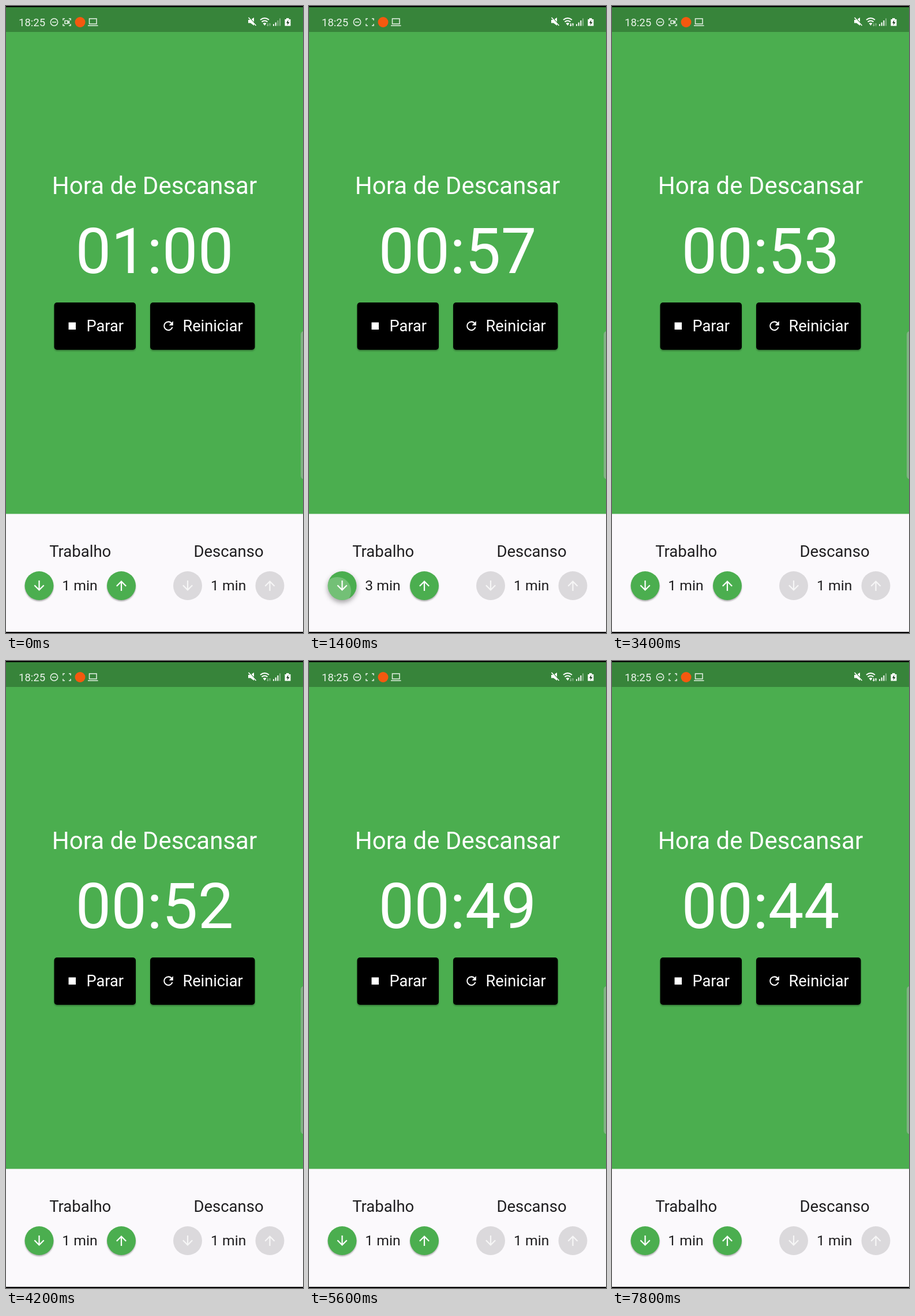
Animation of 515 by 1087 pixels, one loop 8000 ms. Source, as an HTML page:

```html
<!DOCTYPE html>
<html lang="pt">
<head>
<meta charset="utf-8">
<title>Hora de Descansar</title>
<style>
  html, body { margin: 0; width: 100%; height: 100%; overflow: hidden; background: #000; }
  svg { display: block; width: 100vw; height: 100vh; }
  text { font-family: Roboto, sans-serif; fill: #fff; }
  .dark text { fill: #1f1e20; }
  .middle { text-anchor: middle; }
  .raised { filter: drop-shadow(0 2px 1.3px rgba(0, 0, 0, .3)); }
  .pressed { filter: drop-shadow(0 4px 4px rgba(0, 0, 0, .36)); }
  .line { fill: none; stroke: #e6f1e6; stroke-width: 1.5; }
</style>
</head>
<body>
<svg viewBox="0 0 515 1087" preserveAspectRatio="none">
  <defs>
    <path id="arrow" d="M8 0 6.59-1.41 1 4.17V-8h-2V4.17L-6.58-1.42-8 0 0 8z" fill="#fff"/>
    <clipPath id="disc"><circle r="25"/></clipPath>
  </defs>

  <rect y="2" width="515" height="1083" fill="#4bae4f"/>
  <rect y="2" width="515" height="43" fill="#37843a"/>
  <rect y="880.5" width="515" height="204.5" fill="#fbf9fc"/>
  <path d="M515 564q-4 1-4 6v244q0 5 4 6z" fill="#82b285"/>

  <!-- Status bar -->
  <text x="22" y="34.5" font-size="18.5" style="fill:#eaf3ea">18:25</text>
  <g class="line">
    <circle cx="83.5" cy="28" r="6.2"/>
    <path d="M80 28h7"/>
    <path d="M99 25v-3h3M109 22h3v3M112 31v3h-3M102 34h-3v-3"/>
    <path id="camera" d="M102 25.5h5v5h-5zM107 28l2.5-2v4z"/>
    <path d="M144.5 31v-9h12.5v9zM142 34h17.5"/>
  </g>
  <circle cx="128.5" cy="28" r="9" fill="#f4590f"/>
  <g fill="#fff">
    <path d="M420 24h4l6-4v14l-6-4.500h-4z"/>
    <path d="M422 20l12 13" stroke="#37843a" stroke-width="1.500"/>
    <path d="M420.500 20l13 14" stroke="#fff" stroke-width="1.600"/>
    <path d="M441 24q7.500-6 15 0M443.500 27.500q5-4 10 0" fill="none" stroke="#fff" stroke-width="2"/>
    <path d="M445.500 30q3-2 6 0l-3 4z"/>
    <path id="traffic" d="M453 30v3h-1.500l2.300 2.500 2.300-2.500h-1.500v-3zM457 35v-3h-1.500l2-2.500 2 2.500h-1.200v3z"/>
    <g id="bars">
      <rect x="463" y="31.500" width="2" height="3"/>
      <rect x="466.700" y="28.500" width="2" height="6"/>
      <rect x="470.400" y="25" width="2" height="9.500"/>
      <rect x="474.100" y="21.500" width="2" height="13" opacity=".4"/>
    </g>
    <path d="M486 21h4.500v2h3v11.500h-10V23h2.500z"/>
    <path d="M489.500 24l-3.500 5.500h2.500l-1 4 4-5.500h-2.500z" fill="#153a17"/>
  </g>

  <!-- Timer -->
  <text class="middle" x="257.5" y="326" font-size="42">Hora de Descansar</text>
  <text id="clock" class="middle" x="257.5" y="462.5" font-size="110">01:00</text>
  <g class="raised">
    <rect x="83.5" y="514" width="141.5" height="82" rx="5"/>
    <rect x="250" y="514" width="181.5" height="82" rx="5"/>
  </g>
  <rect x="108.5" y="548.5" width="12.5" height="12.5" fill="#fff"/>
  <text x="139.5" y="564" font-size="27.2">Parar</text>
  <path transform="translate(269 542.2) scale(1.04)" fill="#fff"
    d="M17.65 6.35A8 8 0 1 0 19.73 14h-2.08A6 6 0 1 1 12 6c1.66 0 3.14.69 4.22 1.78L13 11h7V4z"/>
  <text x="306.4" y="564" font-size="27.2">Reiniciar</text>

  <!-- Settings -->
  <g class="dark middle">
    <text x="128.7" y="955" font-size="27.5">Trabalho</text>
    <text x="386" y="955" font-size="27.5">Descanso</text>
    <text id="work" x="128" y="1013" font-size="24.7">1 min</text>
    <text x="385.7" y="1013" font-size="24.7">1 min</text>
  </g>
  <g id="buttons"></g>
</svg>
<script>
const LOOP = 8000, STEP = 200;
const $ = id => document.getElementById(id);

// Taps on the work-time buttons; each one takes effect one step later.
const taps = [
  { at: 400, button: 'up', change: 1 },
  { at: 800, button: 'up', change: 1 },
  { at: 1400, button: 'down', change: -1 },
  { at: 1800, button: 'down', change: -1 }
];

function addButton(x, direction, enabled) {
  const id = enabled ? ` id="${direction}"` : '';
  const turn = direction === 'up' ? 180 : 0;
  $('buttons').insertAdjacentHTML('beforeend', `
    <g${id} transform="translate(${x} 1005)">
      <circle class="${enabled ? 'disc raised' : ''}" r="25" fill="${enabled ? '#4bae4f' : '#dbd9dc'}"/>
      <g clip-path="url(#disc)"><circle class="ripple" cx="-8.5" cy="9" r="0" fill="#fff"/></g>
      <use href="#arrow" transform="rotate(${turn}) scale(1.12)" opacity="${enabled ? 1 : .75}"/>
    </g>`);
}

addButton(57.5, 'down', true);
addButton(200, 'up', true);
addButton(315, 'down', false);
addButton(457.5, 'up', false);

function drawPress(button, t) {
  const tap = taps.find(p => p.button === button && t >= p.at && t < p.at + 400);
  const age = tap ? t - tap.at : 0;
  const ripple = $(button).querySelector('.ripple');
  ripple.setAttribute('r', tap ? 24 + age * .1 : 0);
  ripple.setAttribute('opacity', .22 * (1 - age / 400));
  $(button).querySelector('.disc').setAttribute('class', `disc ${tap ? 'pressed' : 'raised'}`);
}

function draw(now) {
  const t = Math.floor(now % LOOP / STEP) * STEP;

  // The countdown runs at twice normal speed.
  const left = 60 - Math.floor(t / 500 + .5);
  const pad = n => String(n).padStart(2, '0');
  $('clock').textContent = `${pad(Math.floor(left / 60))}:${pad(left % 60)}`;

  const minutes = taps.reduce((sum, p) => sum + (t >= p.at + STEP ? p.change : 0), 1);
  $('work').textContent = `${minutes} min`;
  drawPress('down', t);
  drawPress('up', t);

  const phase = t % 1200;
  $('camera').style.opacity = phase < 200 || phase >= 1000 ? 1 : 0;
  const active = t >= 1000 && t < 3400 || t >= 6200;
  $('traffic').style.opacity = active ? 1 : .4;
  $('bars').children[2].style.opacity = t < 1000 ? .4 : 1;
}

function tick() {
  draw(performance.now());
  requestAnimationFrame(tick);
}
tick();
</script>
</body>
</html>
```
